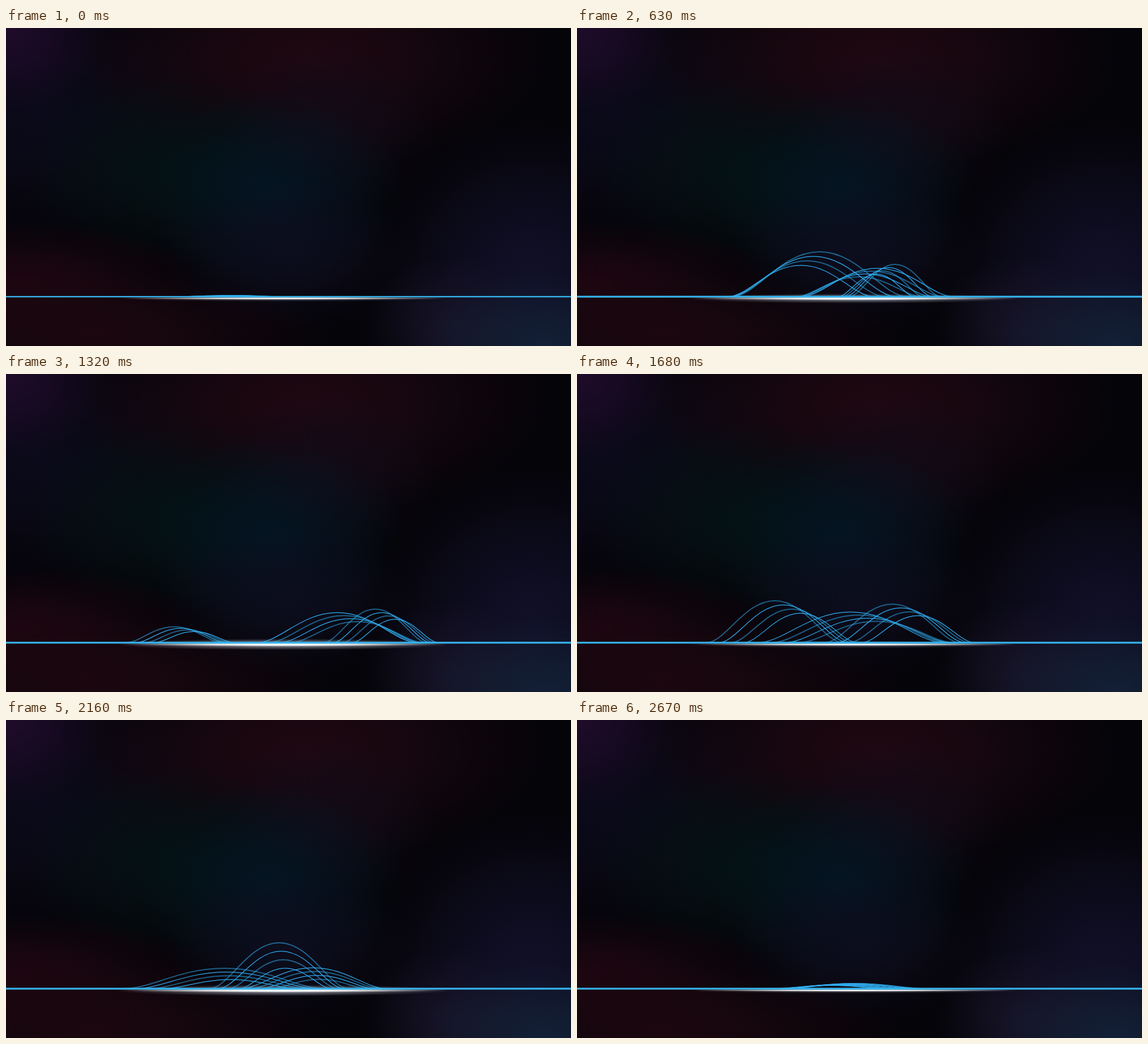
Animation of 998 by 561 pixels, one loop 2700 ms. Source, as an HTML page with a canvas:

```html
<!DOCTYPE html>
<html lang="en">
<head>
<meta charset="utf-8">
<title>Light strands</title>
<style>
html, body { margin: 0; width: 100%; height: 100%; overflow: hidden; background: #050408; }
canvas { display: block; width: 998px; height: 561px; }
</style>
</head>
<body>
<canvas id="stage" width="998" height="561"></canvas>
<script>
const W = 998, H = 561, LOOP = 2700, BASE = 474, STRANDS = 4;
const ctx = document.getElementById('stage').getContext('2d');

const wave = (peak, height, reach) => ({ peak, height, reach });
const pose = (at, glow, ...waves) => ({ at, glow, waves });
const START = wave(390, 2, 75), REST = wave(470, 9, 125);

// Key poses of the three bundles; everything between them is eased.
const POSES = [
  pose(0, .1, START, START, START),
  pose(630, .75, wave(412, 79, 155), wave(514, 50, 135), wave(545, 57, 82)),
  pose(990, .5, wave(425, 57, 172), wave(670, 29, 130), wave(695, 17, 100)),
  pose(1320, 1, wave(315, 28, 85), wave(603, 53, 142), wave(670, 59, 92)),
  pose(1680, .3, wave(372, 74, 121), wave(506, 54, 165), wave(580, 68, 120)),
  pose(2160, 1, wave(391, 36, 178), wave(548, 37, 130), wave(488, 81, 124)),
  pose(2670, .1, REST, REST, REST)
];

function poseAt(i) {
  const n = POSES.length, turn = Math.floor(i / n), found = POSES[i - turn * n];
  return { ...found, at: found.at + turn * LOOP };
}

// Smooth interpolation through unevenly spaced key poses.
function sampler(time) {
  let i = 0;
  while (poseAt(i + 1).at <= time) i++;
  const [a, b, c, d] = [-1, 0, 1, 2].map(o => poseAt(i + o));
  const span = c.at - b.at, u = (time - b.at) / span, v = 1 - u;
  const value = get => {
    const m0 = (get(c) - get(a)) / (c.at - a.at) * span;
    const m1 = (get(d) - get(b)) / (d.at - b.at) * span;
    return get(b) * (1 + 2 * u) * v * v + m0 * u * v * v
      + get(c) * u * u * (3 - 2 * u) - m1 * u * u * v;
  };
  return { value, lift: 1 + .18 * Math.sin(Math.PI * u) };
}

function radial(g, x, y, rx, ry, stops) {
  g.save();
  g.translate(x, y);
  g.scale(rx, ry);
  const fill = g.createRadialGradient(0, 0, 0, 0, 0, 1);
  stops.forEach(([at, color]) => fill.addColorStop(at, color));
  g.fillStyle = fill;
  g.fillRect(-1, -1, 2, 2);
  g.restore();
}

function makeBackdrop() {
  const sheet = document.createElement('canvas');
  sheet.width = W;
  sheet.height = H;
  const g = sheet.getContext('2d');
  g.fillStyle = '#050409';
  g.fillRect(0, 0, W, H);
  const blob = (x, y, rx, ry, rgb, a = 1) => radial(g, x, y, rx, ry,
    [[0, `rgba(${rgb},${a})`], [.4, `rgba(${rgb},${a * .7})`], [1, `rgba(${rgb},0)`]]);
  blob(60, 150, 320, 230, '11,10,26');
  blob(530, 50, 420, 200, '31,8,18');
  blob(560, 180, 200, 150, '19,12,25', .8);
  blob(0, 0, 180, 150, '31,11,42');
  blob(290, 250, 260, 170, '4,19,20', .9);
  blob(470, 290, 230, 180, '4,22,36', .9);
  blob(500, 400, 220, 130, '15,14,32', .8);
  blob(20, 450, 330, 110, '30,6,17');
  blob(150, 540, 420, 110, '28,7,15');
  blob(930, 440, 280, 270, '17,16,40');
  blob(790, 530, 160, 130, '26,21,42', .8);
  blob(950, 560, 220, 130, '19,32,54');
  return sheet;
}

function drawStrand(peak, height, reach, dim) {
  const top = BASE - height;
  ctx.beginPath();
  ctx.moveTo(peak - reach, BASE);
  ctx.bezierCurveTo(peak - reach * .72, BASE, peak - reach * .45, top, peak, top);
  ctx.bezierCurveTo(peak + reach * .45, top, peak + reach * .72, BASE, peak + reach, BASE);
  ctx.strokeStyle = dim ? 'rgba(46,166,230,.55)' : '#30adf2';
  ctx.lineWidth = dim ? 2 : 1.25;
  ctx.stroke();
}

function drawBundle({ peak, height, reach }, time, dimFirst) {
  const drift = 46 * Math.sin(Math.PI * (time - 960) / 1300);
  const dip = Math.max(0, Math.cos(Math.PI * (time - 975) / 690));
  const falloff = .3 + .4 * dip;
  for (let n = 0; n < STRANDS; n++) {
    const k = n / (STRANDS - 1), share = 1 - falloff * k;
    drawStrand(peak + drift * (k - .5), Math.max(0, height) * share,
      reach * Math.sqrt(share), (n % 2 === 0) === dimFirst);
  }
}

function drawGlow(power) {
  radial(ctx, 490, 477, 300, 5 + 5 * power, [
    [0, `rgba(255,255,255,${.5 + .35 * power})`],
    [.45, `rgba(230,235,245,${.2 + .2 * power})`],
    [1, 'rgba(200,210,230,0)']]);
  radial(ctx, 490, 477, 290, 2 + 1.5 * power, [
    [0, '#fff'], [.45, 'rgba(255,255,255,.8)'], [1, 'rgba(255,255,255,0)']]);
}

const backdrop = makeBackdrop();

function draw(time) {
  const { value, lift } = sampler(time);
  ctx.drawImage(backdrop, 0, 0);
  drawGlow(Math.max(0, Math.min(1, value(p => p.glow))));

  for (let b = 0; b < 3; b++) {
    const part = key => value(p => p.waves[b][key]);
    drawBundle(wave(part('peak'), part('height') * lift, part('reach')), time, b !== 1);
  }

  const thick = time < 30 ? 2.4 : 3.2;
  ctx.fillStyle = '#35b5ee';
  ctx.fillRect(0, BASE - thick / 2, W, thick);
}

function frame() {
  draw(performance.now() % LOOP);
  requestAnimationFrame(frame);
}
frame();
</script>
</body>
</html>
```
